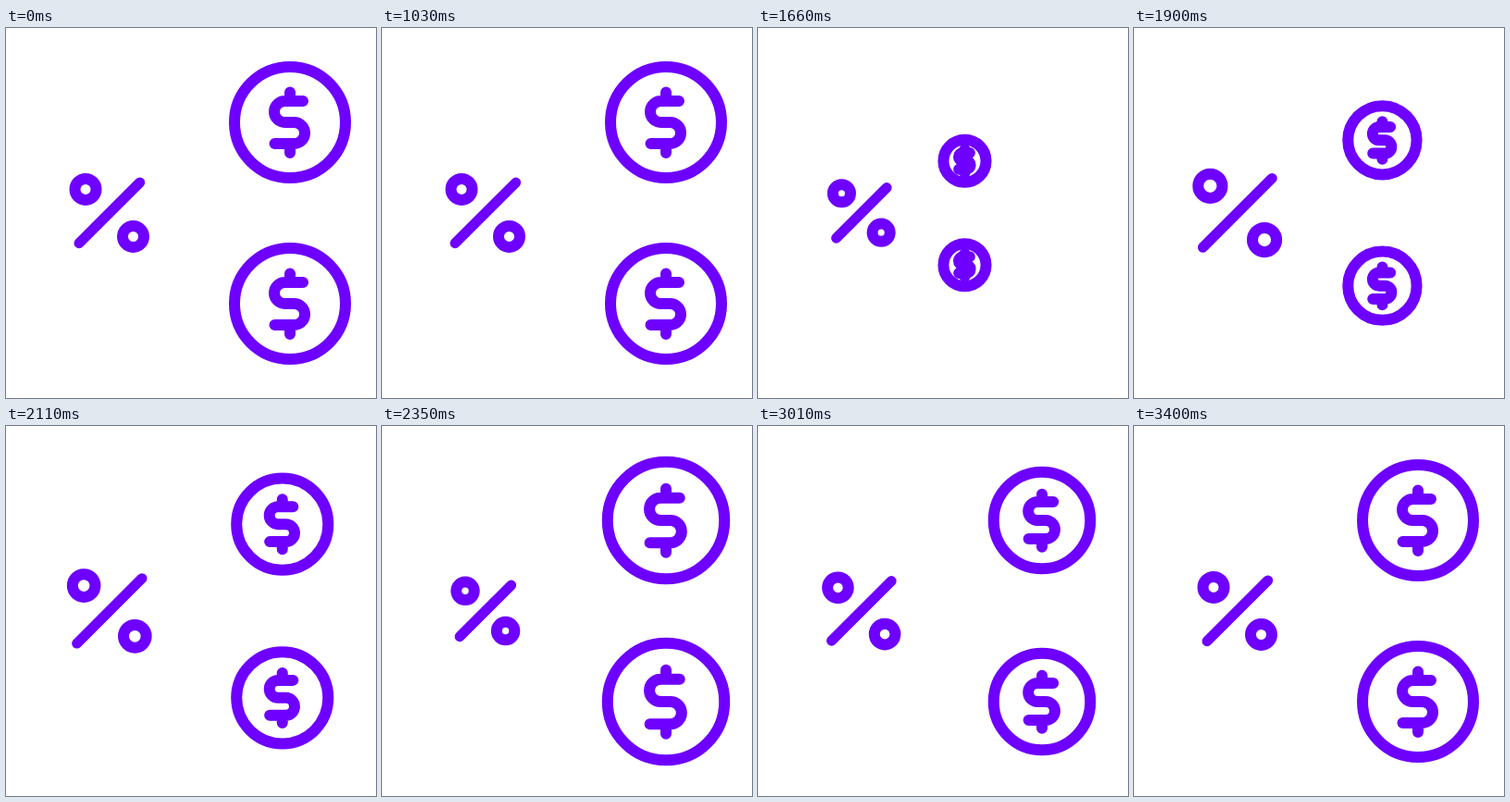
Recreate the animation shown at these times as an HTML page. Size 400 by 400 pixels, loop 3.43 s.

```html
<!DOCTYPE html>
<html lang="en">
<head>
<meta charset="utf-8">
<title>Percent and coins</title>
<style>
  html, body { margin: 0; width: 100%; height: 100%; overflow: hidden; background: #fff; }
  svg { display: block; width: 100vw; height: 100vh; }

  .ink {
    fill: none;
    stroke: #6e00ff;
    stroke-width: 12;
    stroke-linecap: round;
    stroke-linejoin: round;
  }
  circle, path { vector-effect: non-scaling-stroke; }
  .slash { stroke-width: 11; }

  .percent, .coin, .size {
    transform-origin: 0 0;
    animation: 3430ms linear infinite;
  }
  .percent { animation-name: pulse; }
  .coin { --y: -98px; animation-name: travel; }
  .coin.low { --y: 98px; }
  .size { animation-name: grow; }

  @keyframes pulse {
    0%, 29.74% { scale: 1; animation-timing-function: cubic-bezier(.333, 0, .667, 1); }
    43.73% { scale: .7; animation-timing-function: cubic-bezier(.333, 0, .667, 1); }
    57.14% { scale: 1.16; animation-timing-function: cubic-bezier(.333, 0, .667, 1); }
    69.97% { scale: .835; animation-timing-function: cubic-bezier(.333, 0, .667, 1); }
    92.13%, 100% { scale: 1; }
  }

  /* Coins leave along the ray from the percent sign, then jump back near it. */
  @keyframes travel {
    0%, 29.59% {
      translate: 195px var(--y);
      animation-timing-function: cubic-bezier(.333, 0, .667, 0);
    }
    46.79% { translate: 284px calc(var(--y) * 1.457); }
    46.791% {
      translate: 103px calc(var(--y) * .53);
      animation-timing-function: cubic-bezier(.3, .3, .6, 1);
    }
    66.47%, 100% { translate: 195px var(--y); }
  }

  @keyframes grow {
    0%, 29.59% { scale: 1; animation-timing-function: cubic-bezier(.333, 0, .667, 0); }
    46.79% { scale: 0; }
    46.791% { scale: .33; animation-timing-function: cubic-bezier(.33, .33, .75, .78); }
    71.72% { scale: 1.15; animation-timing-function: cubic-bezier(.333, 0, .667, 1); }
    83.09% { scale: .84; animation-timing-function: cubic-bezier(.333, 0, .667, 1); }
    99.7%, 100% { scale: 1; }
  }
</style>
</head>
<body>
<svg viewBox="0 0 400 400">
  <defs>
    <g id="dollar">
      <circle r="60"/>
      <path d="M14 -23H-5.5a11.5 11.5 0 0 0 0 23H4.5a11.5 11.5 0 0 1 0 23H-16.5M0 -32.5V-23M0 23V33"/>
    </g>
  </defs>
  <g class="ink" transform="translate(112 200)">
    <g class="percent">
      <path class="slash" d="M-33 32.7L32.7 -33"/>
      <circle cx="-26" cy="-25.6" r="11.5"/>
      <circle cx="25.5" cy="25.5" r="11.5"/>
    </g>
    <g class="coin"><g class="size"><use href="#dollar"/></g></g>
    <g class="coin low"><g class="size"><use href="#dollar"/></g></g>
  </g>
</svg>
</body>
</html>
```
